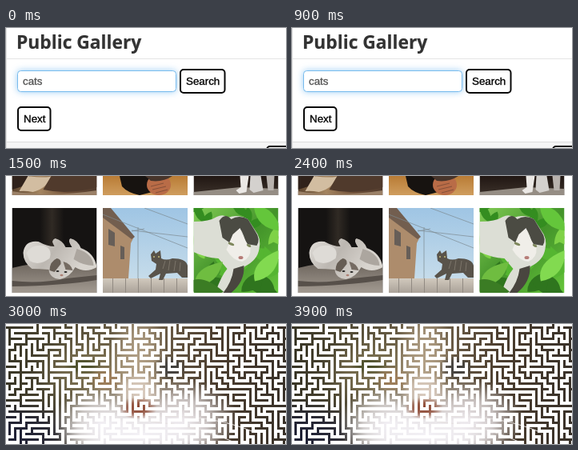
These frames come from a looping animation (350 px wide and 150 px high, 4500 ms). An HTML page with a canvas:

```html
<!DOCTYPE html>
<html lang="en">
<head>
<meta charset="utf-8">
<title>Gallery</title>
<style>
html, body { margin: 0; width: 100%; height: 100%; overflow: hidden; background: #fff; }
canvas { display: block; }
</style>
</head>
<body>
<canvas id="stage" width="350" height="150"></canvas>
<script>
const ctx = document.getElementById('stage').getContext('2d');
const W = 350, H = 150, HOLD = 1500;

function rect(x, y, w, h, fill) {
  ctx.fillStyle = fill;
  ctx.fillRect(x, y, w, h);
}

function shape(path, fill) {
  ctx.fillStyle = fill;
  ctx.fill(new Path2D(path));
}

function line(path, color, width) {
  ctx.strokeStyle = color;
  ctx.lineWidth = width;
  ctx.stroke(new Path2D(path));
}

function oval(x, y, rx, ry, fill, turn = 0) {
  ctx.fillStyle = fill;
  ctx.beginPath();
  ctx.ellipse(x, y, rx, ry, turn, 0, Math.PI * 2);
  ctx.fill();
}

function shade(x0, y0, x1, y1, ...colors) {
  const g = ctx.createLinearGradient(x0, y0, x1, y1);
  colors.forEach((c, i) => g.addColorStop(i / (colors.length - 1), c));
  return g;
}

function glow(x, y, rx, ry, rgb, alpha) {
  ctx.save();
  ctx.translate(x, y);
  ctx.scale(rx, ry);
  const g = ctx.createRadialGradient(0, 0, 0, 0, 0, 1);
  g.addColorStop(0, `rgba(${rgb},${alpha})`);
  g.addColorStop(0.5, `rgba(${rgb},${alpha * 0.75})`);
  g.addColorStop(1, `rgba(${rgb},0)`);
  rect(-1, -1, 2, 2, g);
  ctx.restore();
}

// A hairline outline gives the type a slightly heavier weight.
function text(s, x, y, font, fill, weight = 0.35) {
  ctx.font = font;
  ctx.fillStyle = ctx.strokeStyle = fill;
  ctx.lineWidth = weight;
  ctx.fillText(s, x, y);
  ctx.strokeText(s, x, y);
}

function box(x, y, w, h, color, width) {
  ctx.beginPath();
  ctx.roundRect(x, y, w, h, 4);
  ctx.fillStyle = '#fff';
  ctx.fill();
  ctx.shadowColor = 'transparent';
  ctx.strokeStyle = color;
  ctx.lineWidth = width;
  ctx.stroke();
}

const UI_FONT = '13.33px "Liberation Sans", Arial, sans-serif';

function button(label, x, y, w, h) {
  box(x + 1, y + 1, w - 2, h - 2, '#080808', 2);
  text(label, x + 8, y + 20, UI_FONT, '#000');
}

function drawSearch() {
  text('Public Gallery', 13, 26, 'bold 22.8px "Open Sans", sans-serif', '#333', 0.2);
  rect(0, 38, W, 1, '#e5e5e5');
  rect(0, 143, W, 7, '#f5f5f5');
  rect(0, 142, W, 1, '#ddd');
  rect(0, 0, 1, H, '#e2e2e2');

  ctx.save();
  ctx.shadowColor = 'rgba(82,168,236,.65)';
  ctx.shadowBlur = 8;
  box(14.5, 53.5, 198, 26, '#78bbed', 1);
  ctx.restore();
  text('cats', 21, 71, UI_FONT, '#555');

  button('Search', 217, 51, 57.5, 31);
  button('Next', 14, 98, 42.5, 31);
  box(326, 148, 40, 20, '#080808', 2);
}

function photo(x, y, h, draw) {
  ctx.save();
  ctx.translate(x, y);
  ctx.beginPath();
  ctx.rect(0, 0, 106, h);
  ctx.clip();
  draw();
  ctx.restore();
}

function furClose() {
  rect(0, 0, 106, 24, shade(0, 0, 106, 0, '#5b432d', '#a4845f', '#705039', '#503b2d'));
  shape('M0 0H23L13 13 0 17Z', '#30221b');
  shape('M20 0Q43 3 50 0Q43 16 26 20Q17 18 9 19Z', '#d2bda1');
  shape('M49 0H106V14Q70 24 39 17Z', '#503a2c');
  shape('M0 19Q48 27 106 18V24H0Z', '#9a8067');
}

function personRest() {
  rect(0, 0, 106, 24, shade(0, 0, 0, 24, '#b97c35', '#cf9d5e'));
  shape('M21 0H59Q59 12 66 19L46 24Q31 21 24 13Z', '#171310');
  oval(70, 11, 15, 13, '#b96c47');
  shape('M53 0H87Q75 8 60 6Z', '#47352b');
  line('M60 13L76 9M62 17L79 13M66 21L81 17', '#855039', 1);
}

function catLegs() {
  rect(0, 0, 106, 24, shade(0, 0, 0, 24, '#211713', '#3b312a'));
  shape('M0 20L58 14 106 16V24H0Z', '#958d84');
  shape('M58 0H69L66 20 57 22 53 18 59 14Z', '#ebe8e5');
  shape('M71 0H84L87 18 75 21 70 17Z', '#d4d1ce');
  shape('M91 0H101L100 18H93Z', '#b8b2ad');
}

function catLying() {
  rect(0, 0, 106, 106, '#151312');
  rect(35, 0, 30, 55, shade(35, 0, 65, 0, '#151312', '#302a24', '#151312'));
  shape('M0 75Q55 61 106 72V106H0Z', shade(0, 70, 0, 106, '#6f675f', '#a29a91'));
  shape('M0 91Q35 95 68 88L106 84V90Q62 97 0 98Z', '#57504a');
  shape('M14 56Q16 40 33 42Q44 48 53 48Q48 40 54 38Q64 41 67 49L75 49Q69 40 73 38Q82 40 86 50Q103 56 106 74Q92 82 79 74Q72 87 60 89Q47 88 46 77Q34 76 25 76Q14 68 14 56Z',
    shade(15, 40, 75, 86, '#e1ded9', '#bcb7b1', '#d8d4ce'));
  shape('M18 56Q24 45 40 47Q51 51 47 63Q33 73 22 66Z', '#dedbd6');
  shape('M81 51Q101 57 102 72Q89 72 77 64Z', '#aca69f');
  shape('M47 78Q47 67 56 63Q62 64 61 70L53 80Z', '#665d54');
  shape('M64 67Q73 69 76 78L67 77Z', '#756b62');
  oval(57, 79, 2, 1, '#242321');
  oval(67, 80, 2, 1, '#242321');
  oval(62, 84, 2, 1.2, '#ad8175');
}

function catFence() {
  rect(0, 0, 106, 106, shade(0, 0, 0, 100, '#9fc5e4', '#cbdfeb'));
  shape('M0 0H8L39 36 35 44 32 88H0Z', '#ad8c6c');
  shape('M0 0H10L40 36 36 39 0 12Z', '#725e4f');
  shape('M7 26L15 31V48L7 46ZM22 47L27 49V64H22Z', '#665e58');
  line('M44 24V88M36 29L52 26M0 8L106 50M36 28L106 36M52 0L106 20', '#7d8a91', 0.7);
  rect(0, 88, 106, 18, shade(0, 88, 0, 106, '#d1c9bd', '#aaa299'));
  for (let x = 12; x < 106; x += 16) rect(x, 88, 1, 18, '#918a82');
  shape('M60 58L64 53 66 57 72 53 73 63Q79 66 87 63Q104 63 106 72V87L99 87 93 81 79 82 75 90H70L72 82 60 88 57 85 66 77 67 70 61 66Z', '#59534a');
  line('M78 66L75 76M84 65L82 78M91 66L89 79M97 68L96 79', '#7c756a', 1);
  oval(64, 61, 1, 1, '#c4bb78');
  oval(70, 61, 1, 1, '#c4bb78');
}

function leaf(x, y, size, turn, fill) {
  ctx.save();
  ctx.translate(x, y);
  ctx.rotate(turn);
  ctx.scale(size, size);
  shape('M-1 0Q-.4 -.8 1 0Q-.1 .8 -1 0Z', fill);
  ctx.restore();
}

function catLeaves() {
  rect(0, 0, 106, 106, shade(0, 0, 106, 106, '#82cc55', '#43932a', '#66c63b'));
  for (let i = 0; i < 24; i++) {
    leaf((i * 43) % 112, (i * 29) % 112, 13 + i % 4 * 3, i * 1.7,
      ['#348d20', '#7fd247', '#55b531', '#2f751e'][i % 4]);
  }
  shape('M0 17Q20 17 29 11Q37 7 43 12Q55 7 68 14L77 28Q85 38 82 51Q80 65 64 73L53 87Q45 104 40 106H27Q35 84 42 76L31 63Q15 62 0 55Z', '#dcded5');
  shape('M32 16Q39 5 47 14Q57 8 68 14L77 29Q84 39 79 47L66 45Q63 34 59 27Q53 39 46 44L36 37Z', '#4b4b43');
  shape('M49 33L58 25Q63 40 71 50Q72 62 61 67Q49 66 41 52Z', '#f0eee9');
  shape('M50 76L63 72Q64 92 47 106H37Q48 92 50 76Z', '#49463f');
  oval(47, 45, 4, 1.5, '#7e875c', 0.4);
  oval(69, 47, 3, 1.5, '#7e875c', 0.4);
  oval(59, 62, 3, 2, '#b67c77');
  leaf(19, 82, 23, -0.7, '#6fbd40');
  leaf(92, 72, 25, -0.9, '#82da50');
  leaf(93, 14, 23, 0.7, '#64c63b');
  leaf(14, 100, 24, 0.2, '#3b7c24');
}

function drawGallery() {
  [furClose, personRest, catLegs].forEach((draw, i) => photo(7.5 + i * 113.5, 0, 24, draw));
  [catLying, catFence, catLeaves].forEach((draw, i) => photo(7.5 + i * 113.5, 40, 106, draw));
}

function seeded(seed) {
  return () => (seed = (seed * 16807) % 2147483647) / 2147483647;
}

// Depth-first spanning tree: each edge is one stroke of the maze.
function mazePath(cols, rows, pitch, random) {
  const path = new Path2D();
  const seen = new Set([0]);
  const stack = [[0, 0]];
  const steps = [[1, 0], [-1, 0], [0, 1], [0, -1]];
  while (stack.length) {
    const [x, y] = stack[stack.length - 1];
    const open = steps.map(([dx, dy]) => [x + dx, y + dy]).filter(([a, b]) =>
      a >= 0 && b >= 0 && a < cols && b < rows && !seen.has(b * cols + a));
    if (!open.length) {
      stack.pop();
      continue;
    }
    const next = open[Math.floor(random() * open.length)];
    seen.add(next[1] * cols + next[0]);
    path.moveTo(x * pitch, y * pitch);
    path.lineTo(next[0] * pitch, next[1] * pitch);
    stack.push(next);
  }
  return path;
}

const maze = mazePath(52, 23, 7, seeded(7193));

function drawMaze() {
  rect(0, 0, W, H, shade(0, 0, W, 0, '#383526', '#59513b', '#75664e', '#4b3d2f', '#393129'));
  glow(100, 60, 65, 48, '138,126,91', 0.7);
  glow(96, 52, 24, 12, '63,71,32', 0.85);
  glow(165, 50, 38, 75, '196,177,151', 0.8);
  glow(125, 70, 22, 18, '188,140,99', 0.6);
  glow(205, 55, 22, 16, '49,54,61', 0.75);
  glow(15, 140, 80, 48, '24,27,58', 0.8);
  glow(120, 125, 62, 48, '239,236,240', 1);
  glow(218, 120, 72, 52, '233,228,231', 1);
  glow(168, 140, 100, 40, '245,243,248', 1);
  glow(165, 84, 30, 25, '235,222,214', 0.8);
  glow(165, 105, 24, 14, '139,65,43', 1);
  line('M185 116Q255 112 310 135M181 122Q240 126 288 149', '#e4dfde', 1);
  ctx.save();
  ctx.translate(1, 1);
  ctx.lineCap = 'square';
  ctx.strokeStyle = '#fff';
  ctx.lineWidth = 4;
  ctx.stroke(maze);
  ctx.restore();
}

const scenes = [drawSearch, drawGallery, drawMaze];
const start = performance.now();
let shown = -1;

function tick() {
  const index = Math.floor((performance.now() - start) / HOLD) % scenes.length;
  if (index !== shown) {
    shown = index;
    rect(0, 0, W, H, '#fff');
    scenes[index]();
  }
  requestAnimationFrame(tick);
}
tick();
</script>
</body>
</html>
```
